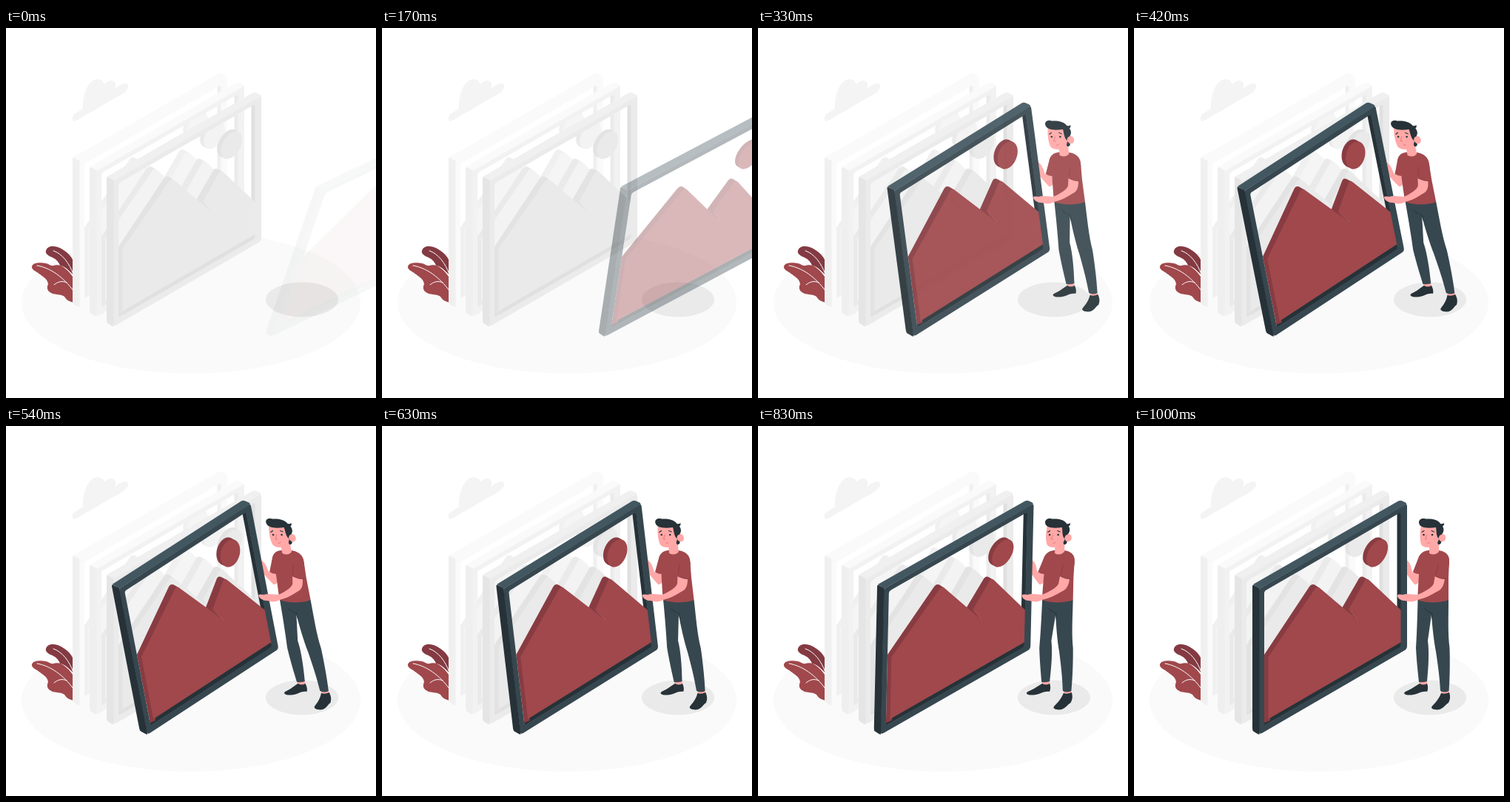
Write an HTML page that moves like this. It is 500 px wide and 500 px high and loops after 1.04 s.

```html
<!DOCTYPE html>
<html lang="en">
<head>
<meta charset="utf-8">
<title>Hanging a picture</title>
<style>
  html, body { margin: 0; width: 100%; height: 100%; overflow: hidden; background: #fff; }
  svg { display: block; width: 100%; height: 100%; }
  .front { fill: var(--front); }
  .top { fill: var(--top); }
  .side { fill: var(--side); }
  .wall { fill: var(--wall); }
  .art { fill: var(--art); }
  .shade { fill: var(--shade); }
  .far { --front: #fafafa; --top: #fafafa; --side: #f0f0f0; --wall: #f0f0f0; --art: #f5f5f5; --shade: #f0f0f0; }
  .middle { --front: #f2f2f2; --top: #fafafa; --side: #efefef; --wall: #ebebeb; --art: #f3f3f3; --shade: #eaeaea; }
  .near { --front: #ebebeb; --top: #f0f0f0; --side: #e5e5e5; --wall: #e0e0e0; --art: #eaeaea; --shade: #e3e3e3; }
  .color { --front: #37474f; --top: #435761; --side: #263238; --wall: #263238; --art: #a0484c; --shade: #883c42; }
  .skin { fill: #ffa8a7; }
  .dark { fill: #263238; }
  .line { fill: none; stroke-linecap: round; }
</style>
</head>
<body>
<svg viewBox="0 0 500 500">
  <defs>
    <g id="frame">
      <path class="wall" d="M355.500 114L361 111V299L176 405V398L355.500 294.500Z"/>
      <g class="shade">
        <circle r="16.7" transform="matrix(.866 -.5 0 1 323.7 169.2)"/>
        <circle r="16.7" transform="matrix(.866 -.5 0 1 326.2 170.6)"/>
      </g>
      <circle class="art" r="16.7" transform="matrix(.866 -.5 0 1 328.7 172)"/>
      <path class="shade" d="M281 246L304 206Q307 202 311 204.500L317 208L292 250L303 263L281 262Z
        M176 309L237 217Q240 212.500 244 214.500L251 219L184 316V398L176 401Z"/>
      <path class="art" d="M181.500 312L244 221Q247 216 251 219L303 263L290 248L312 209Q314 205 318 208.500L361 249V292L181.500 396Z"/>
      <path class="front" fill-rule="evenodd" d="M169 222Q169 220 171 219L365 107Q369 104.500 369 108V297Q369 301 366 303L173 415Q169 417 169 413Z
        M176 226V402Q176 405 179 403L358 299.500Q360.500 298 360.500 295V120Q360.500 116.500 358 118L179 221.500Q176 223 176 226Z"/>
      <path class="top" d="M161 214L357 101.500Q360 100 363 101.500L367 103.500Q369 104.500 368 106L169.500 220Z"/>
      <path class="side" d="M160 217Q160 214 162 215L169.500 219.500V416.500Q168 417 166 415.500L162 413Q160 412 160 409Z"/>
    </g>
  </defs>

  <ellipse cx="250" cy="371" rx="229" ry="96" fill="#fafafa"/>
  <ellipse cx="400" cy="367" rx="49" ry="23.5" fill="#eaeaea"/>
  <path fill="#f4f4f4" d="M90 124C89 120 91 117 95 115L104 109C103 92 110 73 120 70C127 67 132 72 133 76C137 70 146 69 148 75L148 82C152 77 163 73 165 77C166 81 162 86 159 88L95 125C92 127 90 126 90 124Z"/>

  <path fill="#843a42" d="M54 301C56 293 68 294 76 299C86 305 90 311 92 318V335C84 326 79 322 73 321C71 315 66 311 60 309C55 306 53 304 54 301Z"/>
  <path fill="#a0484c" d="M35 322C37 316 48 317 54 318C59 319 60 322 64 321C70 319 76 321 80 325C86 330 89 334 92 339V371C86 370 82 368 79 363C74 359 66 361 61 358C55 355 55 350 57 346C56 338 48 335 42 330C38 328 34 325 35 322Z"/>
  <path class="line" stroke="#fff" d="M42 321C60 324 78 337 91 355M65 347C70 343 75 341 82 344M64 301C76 305 86 318 91 333"/>

  <use href="#frame" class="far" x="-70" y="-39.500"/>
  <use href="#frame" class="middle" x="-47" y="-27"/>
  <use href="#frame" class="near" x="-24" y="-13.500"/>

  <g id="mover">
    <path class="skin" d="M377 196L385 199V211Q382 215 379 214C374 208 371 203 368 200V181Q372 183 374 189L376 198Z"/>
    <use href="#frame" class="color"/>

    <path class="skin" d="M385.500 343H396V350H386ZM415 356H425.500V363H415.500Z"/>
    <path class="dark" d="M386 348Q391 351 396 348C398 353 397 357 396 359C389 358 384 362 378 363C372 364 366 364 365 361C366 358 373 357 378 353Z
      M415 361Q420 363 426 360C428 366 427 370 425 374C421 376 419 381 413 383C408 384 402 383 402 380C404 376 411 372 415 361Z"/>
    <path fill="#37474f" d="M383.500 234C383 260 382 285 381 300C382 320 384 335 385 346Q391 347 396 345C398 325 399 305 397 290L402 255C403 270 405 290 408 305C411 325 413 340 414 358Q420 361 425.500 358C427 340 427 315 426.500 300C424 280 425 260 425 235Z"/>
    <path class="line" stroke="#263238" d="M393 247Q398 252 402.500 253L403 260"/>
    <path fill="#a0484c" d="M398 168C390 169 386 173 384 179L377 197Q380 200 385 200L383 235C396 240 415 239 425 235V205L426 180C425 173 420 169 411 168Z"/>
    <path class="skin" d="M399 158H412V170Q406 176 399 172Z"/>

    <path class="skin" d="M407 201L420 205C419 214 417 220 411 223C402 228 393 233 383 235C379 238 372 238 366 236C362 236 357 234 356 230C355 227 359 227 363 228C370 226 378 228 383 228C393 224 403 218 405 213Z"/>
    <path fill="#a0484c" d="M412 174C419 171 426 176 426 185L423 207Q414 207 407 203Z"/>
    <path class="line" stroke="#883c42" stroke-width=".8" d="M411 188L407 203Q414 207 422 207"/>

    <path class="dark" d="M409 136L417 141L415 158Q413 161 411 160L407 150Z"/>
    <path class="skin" d="M388 135C386 144 386 153 388 160C390 164 397 165 402 163C408 161 411 157 412 153L411 135Z"/>
    <ellipse class="skin" cx="416.500" cy="151" rx="4.800" ry="5.200"/>
    <path class="dark" d="M385 130C385 126 390 124 394 125.500C402 125 411 126 414 132Q417 133 419 131Q419.500 134 417 135.500C420 140 418 145 415 147C413 147 412 150 411.500 152C408 148 409 142 408 137C400 138 393 138 389 136Q385 134 385 130Z"/>
    <circle class="dark" cx="391.500" cy="147" r="1.300"/>
    <circle class="dark" cx="403" cy="147" r="1.300"/>
    <path class="line" stroke="#263238" stroke-width="1.100" d="M389 143.500L392 141.500M402 141.500L405.500 143"/>
    <path class="line" stroke="#e57373" stroke-width=".9" d="M396 147L393.500 153H396M396.500 158.500L399.500 157.500"/>
  </g>
</svg>
<script>
  const mover = document.getElementById("mover");
  const LOOP = 1040, STEP = 1000 / 24, LEAD = 30, PIVOT = 264;

  // Time in ms, skew in degrees, shift in px, opacity
  const keys = [
    [0, -20, 250, 0],
    [600, 10, 0, 1],
    [800, -2, 0, 1],
    [1000, 0, 0, 1]
  ];

  const bezier = (a, b, s) => 3 * (1 - s) ** 2 * s * a + 3 * (1 - s) * s * s * b + s ** 3;

  // Overshooting cubic-bezier(.36, -.01, .5, 1.38)
  function ease(x) {
    let lo = 0, hi = 1;
    for (let i = 0; i < 24; i++) {
      const mid = (lo + hi) / 2;
      if (bezier(.36, .5, mid) < x) lo = mid; else hi = mid;
    }
    return bezier(-.01, 1.38, lo);
  }

  function pose(ms) {
    const i = ms < 600 ? 0 : ms < 800 ? 1 : 2;
    const [from, to] = [keys[i], keys[i + 1]];
    const p = ease(Math.min(1, (ms - from[0]) / (to[0] - from[0])));
    return [1, 2, 3].map(k => from[k] + (to[k] - from[k]) * p);
  }

  function draw(now) {
    const n = Math.floor((now % LOOP) / STEP + .12);
    const [skew, shift, opacity] = pose(n < 2 ? 60 : n * STEP + LEAD);
    const slope = Math.tan(skew * Math.PI / 180);
    mover.setAttribute("transform", `matrix(1 0 ${slope} 1 ${shift - PIVOT * slope} 0)`);
    mover.style.opacity = Math.min(1, opacity);
  }

  const start = performance.now();
  function tick() {
    draw(performance.now() - start);
    requestAnimationFrame(tick);
  }
  tick();
</script>
</body>
</html>
```
